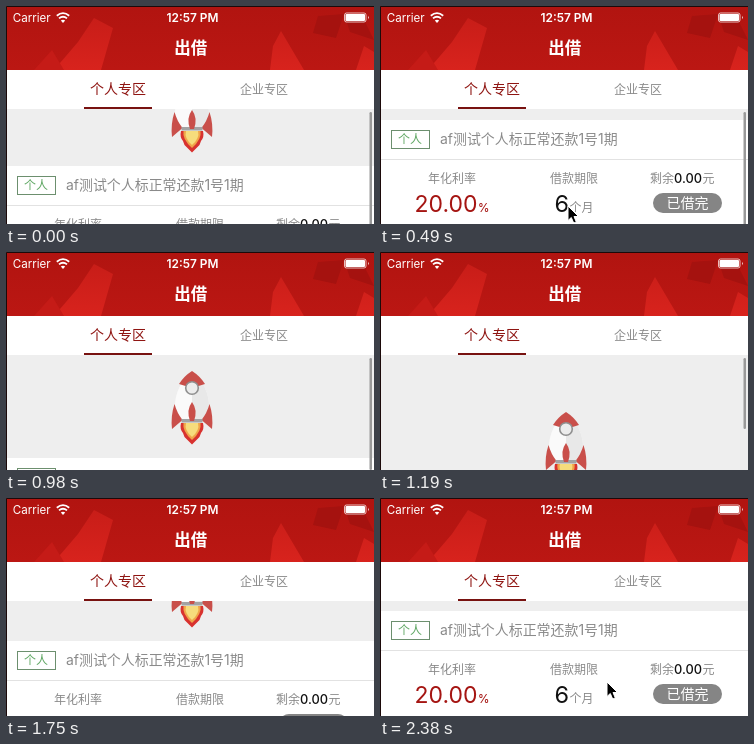
An HTML page for the animation above (2450 ms loop, 368 px wide and 218 px high).

```html
<!DOCTYPE html>
<html lang="zh-CN">
<head>
<meta charset="utf-8">
<title>出借</title>
<style>
  html, body { margin: 0; width: 100%; height: 100%; overflow: hidden; background: #fff; }
  svg { display: block; width: 368px; height: 218px; }
  text { font-family: Inter, "Noto Sans CJK SC", "Noto Sans CJK", sans-serif; }
  .mid { text-anchor: middle; }
  .grey { fill: #8a8a8a; }
  .white { fill: #fff; }
</style>
</head>
<body>
<svg viewBox="0 0 368 218">
  <defs>
    <linearGradient id="bar" x2="0" y2="1">
      <stop stop-color="#b11410"/><stop offset="1" stop-color="#bb1713"/>
    </linearGradient>
    <linearGradient id="shard" x2="0" y2="1">
      <stop stop-color="#c81d18"/><stop offset="1" stop-color="#d8231d"/>
    </linearGradient>
  </defs>

  <rect width="368" height="218" fill="#eee"/>

  <g id="rocket">
    <path d="M186 0C175 9 169 23 169 34Q170 43 175 49H197Q202 43 203 34C203 23 197 9 186 0Z" fill="#fafafa"/>
    <path d="M186 0C197 9 203 23 203 34Q202 43 197 49H186Z" fill="#e8e8e8"/>
    <path d="M186 0Q178 5 173 13Q186 18 199 13Q194 5 186 0Z" fill="#c94f4a"/>
    <circle cx="186" cy="17" r="6.3" fill="#ececec" stroke="#8f8f8f" stroke-width="1.6"/>
    <path id="fin" d="M168.500 33Q164.500 45 166 58L176.500 49Q171 42 168.500 33Z" fill="#c94f4a"/>
    <use href="#fin" transform="matrix(-1 0 0 1 372 0)"/>
    <g id="flame">
      <path d="M175 52H197Q198.500 58 195 62L193.500 66L186 73.500L178.500 66L177 62Q173.500 58 175 52Z" fill="#d8322f"/>
      <path d="M177.500 52H194.500Q196 60 186 69Q176 60 177.500 52Z" fill="#f0a54a"/>
      <path d="M180 52H192Q194 59 186 66Q178 59 180 52Z" fill="#f6dc7c"/>
    </g>
    <rect x="175.500" y="48" width="21" height="3.500" fill="#a3a3a3"/>
    <path d="M186 31Q192 39 188 50H184Q180 39 186 31Z" fill="#c94f4a"/>
    <g id="sparks" fill="#f0d878"></g>
  </g>

  <g id="card">
    <rect y="113" width="368" height="110" fill="#fff"/>
    <path d="M0 152.500H368" stroke="#e2e2e2"/>
    <rect x="11.500" y="123.500" width="38" height="18" fill="#fff" stroke="#6c8f6e"/>
    <text class="mid" x="30" y="137" font-size="12" fill="#5fa763">个人</text>
    <text class="grey" x="60" y="137.300" font-size="13.950">af测试个人标正常还款1号1期</text>
    <g class="grey" font-size="12">
      <text class="mid" x="72" y="176">年化利率</text>
      <text class="mid" x="194" y="176">借款期限</text>
      <text x="270" y="176">剩余</text>
      <text x="322.500" y="176">元</text>
      <text x="189.500" y="205">个月</text>
    </g>
    <text x="294" y="176" font-size="12.800" font-weight="500" fill="#111">0.00</text>
    <text x="34.500" y="205" font-size="23" fill="#a51512">20.00</text>
    <text x="98" y="205" font-size="11.500" font-weight="500" fill="#a51512">%</text>
    <text x="174.500" y="205" font-size="23.500" fill="#111">6</text>
    <rect x="273" y="186" width="69" height="20" rx="10" fill="#858585"/>
    <text class="mid white" x="307.500" y="201.200" font-size="14">已借完</text>
  </g>

  <rect id="thumb" x="363.500" y="106" width="2.500" rx="1.250" fill="#999"/>

  <rect y="63" width="368" height="40" fill="#fff"/>
  <text class="mid" x="112" y="88.300" font-size="14" fill="#8f1512">个人专区</text>
  <text class="mid grey" x="258" y="88.300" font-size="12">企业专区</text>
  <rect x="78" y="101" width="68" height="2" fill="#781210"/>

  <rect width="368" height="64" fill="url(#bar)"/>
  <path d="M88 12L107 22L95 64H48L72 36ZM275 25L298 64H264L267 40ZM358 40L368 46V64H350Z" fill="url(#shard)"/>
  <path d="M46 44L58 64H28Z" fill="#c51b17"/>
  <path d="M312 10L338 8L330 32L307 27ZM338 8L358 14L368 34L344 26Z" fill="#a5120f"/>

  <g class="white">
    <text x="6.800" y="15.500" font-size="11.600">Carrier</text>
    <text class="mid" x="186.500" y="15.500" font-size="11.900" font-weight="600">12:57 PM</text>
    <text class="mid" x="184.800" y="48.300" font-size="16.500" font-weight="600">出借</text>
    <path d="M57 17L54.800 14.600Q57 12.800 59.200 14.600Z"/>
    <rect x="339.500" y="8" width="19.500" height="7" rx="1"/>
    <path d="M362 9.800Q363.600 11.500 362 13.200Z"/>
  </g>
  <g fill="none" stroke="#fff">
    <path d="M50.800 9.800Q57 4.400 63.200 9.800M53 12.400Q57 9 61 12.400" stroke-width="1.800"/>
    <rect x="338.500" y="7" width="21.500" height="9" rx="2" stroke-width=".9" opacity=".8"/>
  </g>

  <path d="M.5 218V.5H368" fill="none" stroke="#1c0a0a"/>

  <path id="arrow" d="M0 0V14.500L3.300 11.500L5.700 17L8.300 15.900L6 10.500H10.500Z"
        fill="#000" stroke="#fff" stroke-width="1"/>
</svg>
<script>
const LOOP = 2450, STEP = 70;
const $ = id => document.getElementById(id);

const out = p => 1 - (1 - p) ** 2.3;
const soft = p => 1 - (1 - p) ** 1.4;
const inOut = p => p * p * (3 - 2 * p);

// [start, end, from, to, ease]
const pull = [
  [0, 630, 47, 0, out],
  [700, 1190, 0, 134, soft],
  [1190, 1540, 134, 84, inOut],
  [1540, 1890, 84, 0, inOut]
];

// [time, x, y]
const moves = [
  [[490, 188, 200], [560, 186, 100], [630, 184, 32], [700, 179, 142]],
  [[1960, 214, 120], [2030, 218, 4], [2100, 222, 120], [2170, 225, 177], [2370, 225, 177], [2380, 227, 184], [2450, 227, 184]]
];

function offsetAt(t) {
  const seg = pull.find(([a, b]) => t >= a && t < b);
  if (!seg) return 0;
  const [a, b, from, to, ease] = seg;
  return from + (to - from) * ease((t - a) / (b - a));
}

function along(path, t) {
  for (let i = 1; i < path.length; i++) {
    const [a, x, y] = path[i - 1], [b, u, v] = path[i];
    if (t >= a && t <= b) {
      const p = (t - a) / (b - a);
      return [x + (u - x) * p, y + (v - y) * p];
    }
  }
  return null;
}

function cursorAt(t, offset) {
  // While dragging, the hand outruns the rubber-banded list.
  if (t > 700 && t < 1190) return [179, 142 + offset * 1.8];
  return along(moves[0], t) || along(moves[1], t);
}

const shift = (el, x, y) => el.setAttribute("transform", `translate(${x} ${y})`);
const show = (el, on) => el.setAttribute("visibility", on ? "visible" : "hidden");

const sparks = [[161, 70], [212, 70], [164, 53], [213, 53], [179, 73], [194, 73]].map(([x, y]) => {
  const r = document.createElementNS("http://www.w3.org/2000/svg", "rect");
  for (const [k, v] of Object.entries({ x: x - 1.5, y: y - 1.5, width: 3, height: 3 })) r.setAttribute(k, v);
  $("sparks").append(r);
  return r;
});

function draw(time) {
  const n = Math.floor((time % LOOP) / STEP + 1e-6);
  const t = n * STEP;
  const offset = Math.round(offsetAt(t));
  shift($("card"), 0, offset);
  shift($("rocket"), 0, 26 + offset);

  const burning = t >= 1330 && t <= 1680;
  show($("sparks"), burning);
  sparks.forEach((s, i) => shift(s, 0, ((n - 22) * (i % 2 ? 2 : 3)) % 5));
  const size = burning && n % 2 ? 0.92 : 1;
  $("flame").setAttribute("transform", `translate(0 ${52 * (1 - size)}) scale(1 ${size})`);

  $("thumb").setAttribute("height", 205 - offset);
  $("thumb").setAttribute("opacity", Math.max(0, Math.min(1, (1470 - t) / 210)));

  const hand = cursorAt(t, offset);
  show($("arrow"), hand);
  if (hand) shift($("arrow"), ...hand);
}

const start = performance.now();
function tick(now) {
  draw(Math.max(0, now - start));
  requestAnimationFrame(tick);
}
draw(0);
requestAnimationFrame(tick);
</script>
</body>
</html>
```
